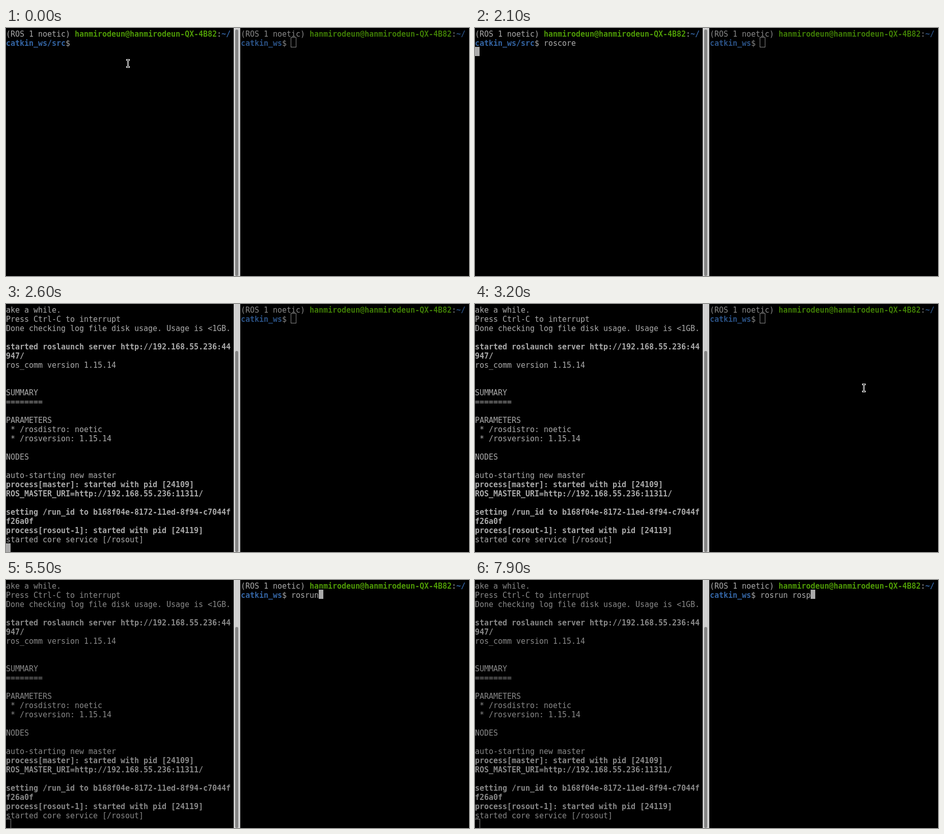
An HTML page with a canvas that plays this animation: 909 px wide and 486 px high, repeating every 8 s.

```html
<!DOCTYPE html>
<html lang="en">
<head>
<meta charset="utf-8">
<title>Terminal session</title>
<style>
html, body { margin: 0; width: 100%; height: 100%; overflow: hidden; background: #000; }
canvas { display: block; }
</style>
</head>
<body>
<canvas id="stage" width="909" height="486"></canvas>
<script>
const ctx = document.getElementById('stage').getContext('2d');
const LOOP = 8000, CELL_W = 9, CELL_H = 18, TOP = 1, BASELINE = 17, COLS = 49;
const VISIBLE_ROWS = 27, HEIGHT = 486, PANE_HEIGHT = 490, RIGHT_X = 461;
const FOCUS_SWITCH = 3500;
const FONT = '15px "DejaVu Sans Mono", monospace';

const ACTIVE = { text: '#aaaaaa', green: '#4e9a06', blue: '#3465a4' };
const DIMMED = { text: '#888888', green: '#3e7b05', blue: '#2a5184' };

const USER = 'hanmirodeun';
const HOST = USER + '-QX-4B82';
const RUN_ID = 'b168f04e-8172-11ed-8f94-c7044ff26a0f';

// A leading "!" marks a bold line; long lines wrap at the pane width.
const OUTPUT = [
  `... logging to /home/${USER}/.ros/log/${RUN_ID}/roslaunch-${HOST}-24101.log`,
  'Checking log directory for disk usage. This may take a while.',
  'Press Ctrl-C to interrupt',
  'Done checking log file disk usage. Usage is <1GB.',
  '',
  '!started roslaunch server http://192.168.55.236:44947/',
  'ros_comm version 1.15.14',
  '', '',
  'SUMMARY',
  '========',
  '',
  'PARAMETERS',
  ' * /rosdistro: noetic',
  ' * /rosversion: 1.15.14',
  '',
  'NODES',
  '',
  'auto-starting new master',
  '!process[master]: started with pid [24109]',
  '!ROS_MASTER_URI=http://192.168.55.236:11311/',
  '',
  `!setting /run_id to ${RUN_ID}`,
  '!process[rosout-1]: started with pid [24119]',
  'started core service [/rosout]'
].flatMap(line => {
  const bold = line.startsWith('!');
  const parts = line.slice(bold ? 1 : 0).match(new RegExp(`.{1,${COLS}}`, 'g')) || [''];
  return parts.map(text => [{ text, bold, tone: 'text' }]);
});

// Steps are [start time, value].
const LEFT_TYPED = [[0, 0], [1000, 1], [1100, 3], [1300, 4], [1600, 5], [2000, 7]];
const RIGHT_TYPED = [[0, 0], [4600, 1], [5000, 3], [5200, 4], [5500, 6], [6100, 7],
  [7400, 8], [7500, 9], [7600, 10], [7900, 11]];
const LEFT_ROWS = [[0, 1], [2100, 2], [2400, 9], [2500, 26], [2600, 32]];
const LEFT_CURSOR = [[0, 'off'], [400, 'solid'], [2900, 'off'], [FOCUS_SWITCH, 'hollow']];
const RIGHT_CURSOR = [[0, 'hollow'], [FOCUS_SWITCH, 'solid'], [4500, 'off'], [4600, 'solid'],
  [6000, 'off'], [6100, 'solid'], [6700, 'off'], [7300, 'solid']];
const POINTER = [[0, [236, 61]], [800, null], [2900, [330, 68]], [3000, [560, 96]],
  [3100, [773, 146]], [3200, [760, 156]], [4600, null]];

function valueAt(steps, t) {
  let value;
  for (const [start, v] of steps) if (t >= start) value = v;
  return value;
}

function promptRows(folder, command) {
  return [
    [
      { text: '(ROS 1 noetic) ', tone: 'text' },
      { text: `${USER}@${HOST}`, tone: 'green', bold: true },
      { text: ':', tone: 'text' },
      { text: '~/', tone: 'blue', bold: true }
    ],
    [
      { text: folder, tone: 'blue', bold: true },
      { text: '$ ' + command, tone: 'text' }
    ]
  ];
}

function drawRows(x, rows, palette) {
  rows.forEach((row, r) => {
    let col = 0;
    for (const { text, tone, bold } of row) {
      ctx.font = (bold ? 'bold ' : '') + FONT;
      ctx.fillStyle = palette[tone];
      for (const char of text) {
        ctx.fillText(char, x + CELL_W * col++, BASELINE + CELL_H * r);
      }
    }
  });
}

function drawCursor(x, col, row, mode, palette) {
  const left = x + col * CELL_W, top = TOP + row * CELL_H;
  if (mode === 'solid') {
    ctx.fillStyle = palette.text;
    ctx.fillRect(left, top, CELL_W, CELL_H);
  } else if (mode === 'hollow') {
    ctx.strokeStyle = palette.text;
    ctx.lineWidth = 1;
    ctx.strokeRect(left - 0.5, top - 0.5, CELL_W + 1, CELL_H + 1);
  }
}

function drawScrollbar(hidden, total) {
  ctx.fillStyle = '#d0d0d0';
  ctx.fillRect(447, 0, 12, HEIGHT);
  ctx.fillStyle = '#b8b8b8';
  ctx.fillRect(459, 0, 1, HEIGHT);
  const top = 3 + Math.round(PANE_HEIGHT * hidden / total);
  ctx.fillStyle = '#858585';
  ctx.beginPath();
  ctx.roundRect(450, top, 6, HEIGHT - top, 3);
  ctx.fill();
}

function drawPointer([x, y]) {
  ctx.fillStyle = '#fff';
  ctx.fillRect(x, y, 7, 3);
  ctx.fillRect(x + 2, y, 3, 17);
  ctx.fillRect(x, y + 14, 7, 3);
  ctx.fillStyle = '#000';
  ctx.fillRect(x + 1, y + 1, 5, 1);
  ctx.fillRect(x + 3, y + 1, 1, 15);
  ctx.fillRect(x + 1, y + 15, 5, 1);
}

function drawLeft(t) {
  const palette = t < FOCUS_SWITCH ? ACTIVE : DIMMED;
  const typed = valueAt(LEFT_TYPED, t);
  const count = valueAt(LEFT_ROWS, t);
  const hidden = Math.max(0, count + 1 - VISIBLE_ROWS);
  const prompt = promptRows('catkin_ws/src', 'roscore'.slice(0, typed));
  const rows = prompt.concat(OUTPUT).slice(hidden, Math.max(count, 2));
  drawRows(0, rows, palette);
  const col = count === 1 ? 15 + typed : 0;
  drawCursor(0, col, Math.max(count, 1) - hidden, valueAt(LEFT_CURSOR, t), palette);
  drawScrollbar(hidden, count + 1);
}

function drawRight(t) {
  const palette = t < FOCUS_SWITCH ? DIMMED : ACTIVE;
  const typed = valueAt(RIGHT_TYPED, t);
  drawRows(RIGHT_X, promptRows('catkin_ws', 'rosrun rosp'.slice(0, typed)), palette);
  drawCursor(RIGHT_X, 11 + typed, 1, valueAt(RIGHT_CURSOR, t), palette);
}

function render(t) {
  ctx.fillStyle = '#000';
  ctx.fillRect(0, 0, 909, HEIGHT);
  drawLeft(t);
  drawRight(t);
  const pointer = valueAt(POINTER, t);
  if (pointer) drawPointer(pointer);
}

const start = performance.now();
function tick() {
  render((performance.now() - start) % LOOP);
  requestAnimationFrame(tick);
}
tick();
</script>
</body>
</html>
```
